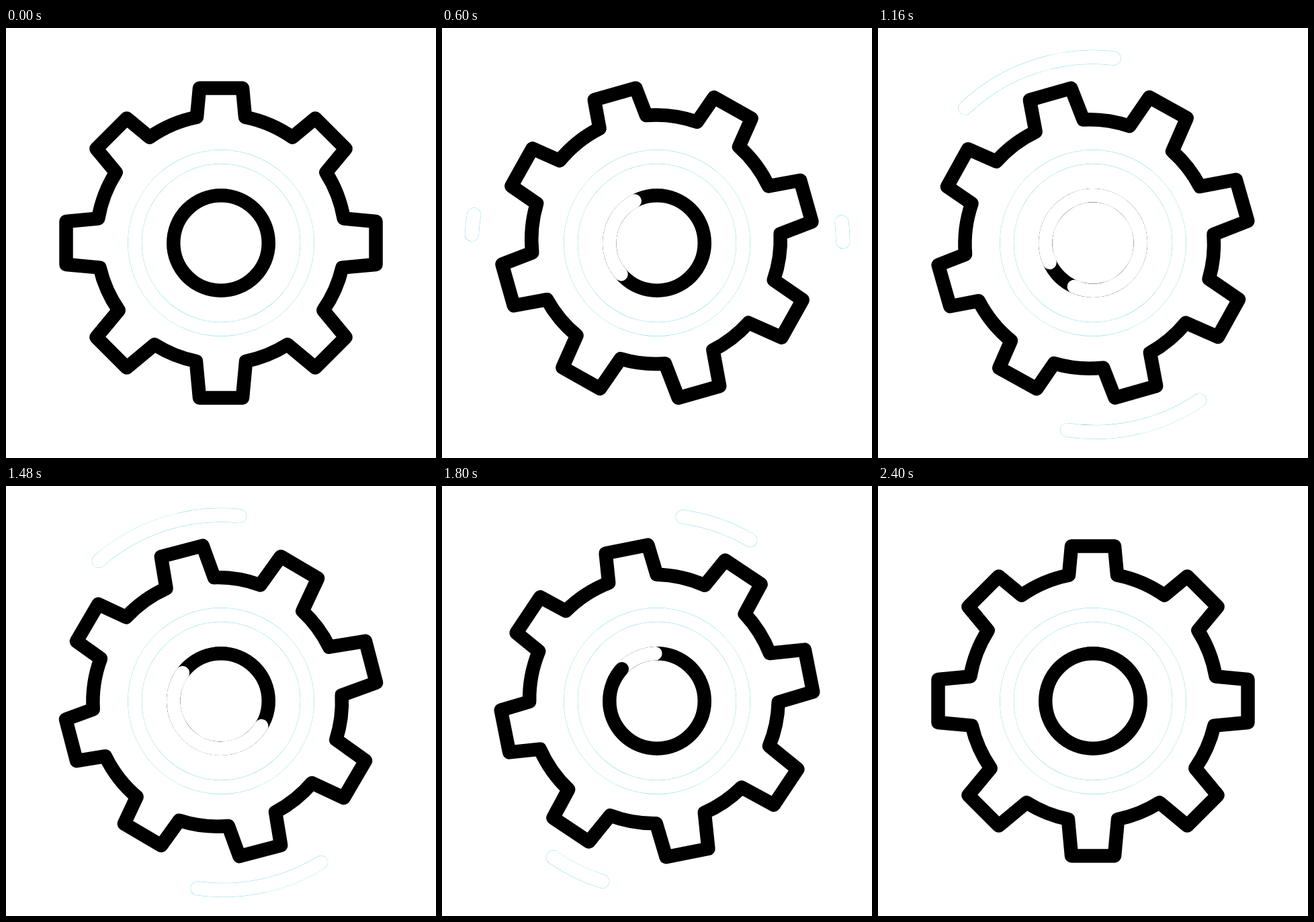
Animation, 640 px wide and 640 px high, one loop 2.48 s. Source, as an HTML page with a canvas:

```html
<!DOCTYPE html>
<html lang="en">
<head>
<meta charset="utf-8">
<title>Turning gear</title>
<style>
  html, body { margin: 0; width: 100%; height: 100%; overflow: hidden; background: #fff; }
  canvas { display: block; width: 640px; height: 640px; }
</style>
</head>
<body>
<canvas id="stage" width="640" height="640"></canvas>
<script>
const ctx = document.getElementById('stage').getContext('2d');
const LOOP = 2480, STEP = 40, LINE = 20.5, HUB = 70.75;
const CYAN = '#3cc8cc';
const rad = deg => deg * Math.PI / 180;

// Easing
const smooth = x => x * x * (3 - 2 * x);
const speedUp = p => x => x ** p;
const slowDown = p => x => 1 - (1 - x) ** p;
const bezier = (x1, x2) => x => {
  let lo = 0, hi = 1;
  for (let i = 0; i < 24; i++) {
    const s = (lo + hi) / 2, r = 1 - s;
    if (3 * s * r * (r * x1 + s * x2) + s ** 3 < x) lo = s; else hi = s;
  }
  return smooth(lo);
};

// Goes from 0 to size and back again.
function swing(size, start, peak, end, rise, fall) {
  const part = (t, a, b) => Math.min(1, Math.max(0, (t - a) / (b - a)));
  return t => size * (t < peak ? rise(part(t, start, peak)) : 1 - fall(part(t, peak, end)));
}

// Angles are clockwise degrees from the top; every part swings anticlockwise first.
const turn = swing(110, 0, 1280, 2400, bezier(0.888, 0.673), bezier(0.525, 0.393));
const lineHead = swing(137, 585, 1290, 2060, slowDown(2.1), speedUp(2.2));
const lineTail = swing(85.3, 600, 1290, 2060, slowDown(2.2), speedUp(2.9));
const gapHead = swing(530, 365, 1090, 1925, smooth, slowDown(1.27));
const gapTail = swing(185, 440, 1090, 1860, smooth, slowDown(1.75));

const sweeps = [
  { x: 0, y: 0, r: 276.7, base: 89.6, stretch: 1 },
  { x: 3, y: 2.5, r: 279, base: 279.2, stretch: 1.09 }
];

// Eight tapered teeth on a rim whose centre sits a little above the axle.
function gearPath() {
  const rim = 185.3, lift = 5.5, tip = 230.5;
  const path = new Path2D();
  const place = (k, x, r) => {
    const c = Math.cos(rad(45 * k)), s = Math.sin(rad(45 * k));
    return [x * c + r * s, x * s - r * c];
  };
  // Direction from the rim centre to where a tooth's flank meets the rim.
  const foot = (k, side) => {
    const c = Math.cos(rad(45 * k)), s = Math.sin(rad(45 * k));
    let half = 36, r;
    for (let n = 0; n < 3; n++) {
      r = lift * c + Math.sqrt(rim ** 2 - (side * half + lift * s) ** 2);
      half = 32 + (tip - r) * 0.093;
    }
    const [x, y] = place(k, side * half, r);
    return Math.atan2(y + lift, x);
  };
  for (let k = 0; k < 8; k++) {
    path.lineTo(...place(k, -32, tip));
    path.lineTo(...place(k, 32, tip));
    path.arc(0, -lift, rim, foot(k, 1), foot(k + 1, -1));
  }
  path.closePath();
  return path;
}
const gear = gearPath();

function arc(r, from, to, color, width = LINE) {
  ctx.beginPath();
  ctx.arc(0, 0, r, rad(from - 90), rad(to - 90));
  ctx.strokeStyle = color;
  ctx.lineWidth = width;
  ctx.stroke();
}

// White stroke with a hairline rim.
function ghost(r, from, to) {
  arc(r, from, to, CYAN, LINE + 0.4);
  arc(r, from, to, '#fff');
}

function drawSweeps(t) {
  if (t < 560 || t > 2050) return;
  for (const { x, y, r, base, stretch } of sweeps) {
    const tail = base - stretch * lineTail(t);
    const head = Math.min(base - lineHead(t), tail - 0.01);
    ctx.save();
    ctx.translate(x, y);
    ghost(r, head, tail);
    ctx.restore();
  }
}

function drawGear(t) {
  ctx.save();
  ctx.rotate(rad(-turn(t)));
  ctx.strokeStyle = '#000';
  ctx.lineWidth = LINE;
  ctx.stroke(gear);
  ctx.restore();
}

function drawHub(t) {
  const head = -gapHead(t), tail = -gapTail(t);
  arc(HUB, 0, 360, '#000');
  if (tail - head < 0.5) return;
  arc(HUB, head, tail, '#fff');
  // Late in the swing the black ring closes with its own round end.
  if (t > 1640) arc(HUB, head - 20, head, '#000');
}

function draw(t) {
  ctx.setTransform(1, 0, 0, 1, 0, 0);
  ctx.fillStyle = '#fff';
  ctx.fillRect(0, 0, 640, 640);
  ctx.translate(320, 320);
  ctx.lineCap = ctx.lineJoin = 'round';
  drawSweeps(t);
  drawGear(t);
  ghost(128.3, 0, 360);
  drawHub(t);
}

const start = performance.now();
function frame() {
  const t = (performance.now() - start) % LOOP;
  draw(Math.floor(t / STEP) * STEP);
  requestAnimationFrame(frame);
}
frame();
</script>
</body>
</html>
```
